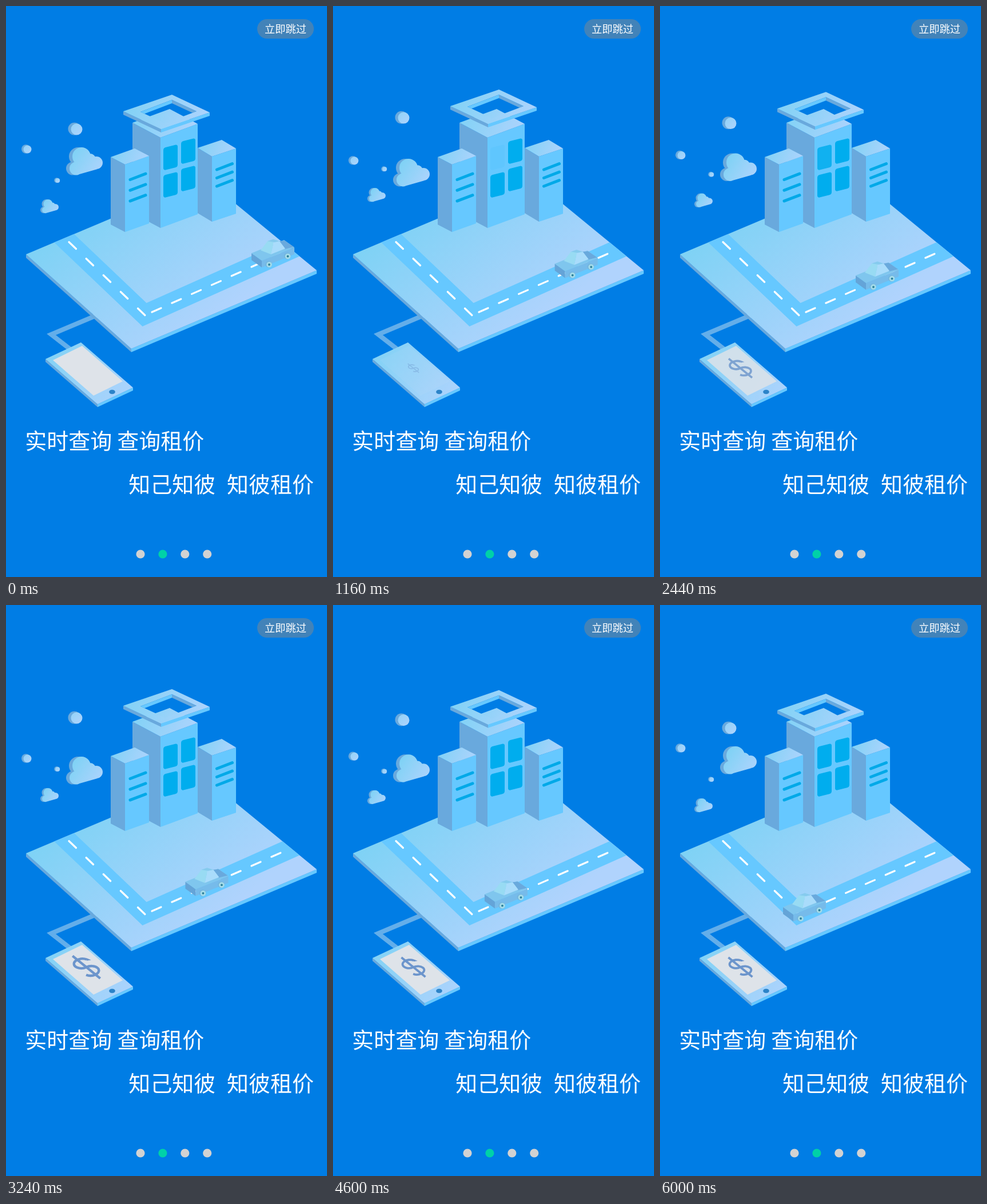
An HTML page with a canvas that plays this animation: 561x998 px, repeating every 6.04 s.

```html
<!DOCTYPE html>
<html lang="zh-CN">
<head>
<meta charset="utf-8">
<style>
  html, body { margin: 0; width: 100%; height: 100%; overflow: hidden; background: #007de5; }
  canvas, svg { position: absolute; left: 0; top: 0; width: 561px; height: 998px; }
  text { fill: #fff; font-family: "Noto Sans CJK SC", "Noto Sans CJK", "Noto Sans", sans-serif; }
  .big { font-size: 38px; }
  .skip { font-size: 18.3px; text-anchor: middle; }
</style>
</head>
<body>
<canvas id="stage" width="561" height="998"></canvas>
<svg viewBox="0 0 561 998">
  <text class="skip" x="488.5" y="46.5">立即跳过</text>
  <text class="big" x="33.3" y="774">实时查询</text>
  <text class="big" x="194.3" y="774">查询租价</text>
  <text class="big" x="214.3" y="850">知己知彼</text>
  <text class="big" x="386" y="850">知彼租价</text>
</svg>
<script>
const ctx = document.getElementById('stage').getContext('2d');
const LOOP = 6040, STEP = 40, TRIP = 6000;
const BG = '#007de5', SHADE = '#69a9dd', LIT = '#66c8ff', PANE = '#00adee';
const TAU = Math.PI * 2;

// Runs a drawing with its own canvas state, moved by (dx, dy)
function at(dx, dy, paint) {
  ctx.save();
  ctx.translate(dx, dy);
  paint();
  ctx.restore();
}

function sheen(x0, y0, x1, y1) {
  const g = ctx.createLinearGradient(x0, y0, x1, y1);
  g.addColorStop(0, '#7fd2f5');
  g.addColorStop(1, '#b0d3fd');
  return g;
}

function trace(...pts) {
  pts.forEach(([x, y], i) => i ? ctx.lineTo(x, y) : ctx.moveTo(x, y));
}

function poly(fill, ...pts) {
  ctx.beginPath();
  trace(...pts);
  ctx.fillStyle = fill;
  ctx.fill();
}

function stroke(color, width, cap, ...pts) {
  ctx.beginPath();
  trace(...pts);
  ctx.strokeStyle = color;
  ctx.lineWidth = width;
  ctx.lineCap = cap;
  ctx.stroke();
}

function disc(fill, x, y, rx, ry = rx) {
  ctx.beginPath();
  ctx.ellipse(x, y, rx, ry, 0, 0, TAU);
  ctx.fillStyle = fill;
  ctx.fill();
}

const add = (p, q) => [p[0] + q[0], p[1] + q[1]];

// Corners left, back, right, front of a tilted tile with edges a (backwards) and b (forwards)
function tile(left, a, b) {
  return [left, add(left, a), add(add(left, a), b), add(left, b)];
}

function slab([left, back, right, front], h, top, side = SHADE, face = LIT) {
  const down = [0, h];
  poly(side, left, front, add(front, down), add(left, down));
  poly(face, front, right, add(right, down), add(front, down));
  poly(top || sheen(left[0], back[1], right[0], front[1]), left, back, right, front);
}

function ground() {
  stroke('#63aeea', 8, 'butt', [160, 540], [79, 574], [115, 602]);
  const base = [[35, 434], [348, 302], [543, 462], [219, 599]];
  slab(base, 6, sheen(150, 345, 340, 575));
  ctx.save();
  ctx.beginPath();
  trace(...base);
  ctx.clip();
  stroke(LIT, 34.5, 'butt', [87, 392], [242, 539.5], [530, 411]);
  ctx.restore();
  for (let i = 0; i < 5; i++) {
    at(110 + i * 30.1, 412.5 + i * 29, () => stroke('#fff', 3.2, 'round', [0, 0], [12.5, 12]));
  }
  for (let i = 0; i < 7; i++) {
    at(255 + i * 34.8, 535 - i * 15.8, () => stroke('#fff', 3.2, 'round', [0, 0], [16, -7]));
  }
}

function windows(fade) {
  for (let i = 0; i < 4; i++) {
    const col = i % 2, row = i >> 1;
    ctx.save();
    ctx.transform(1, -0.25, 0, 1, 275 + col * 31, 248 - col * 11 + row * 48);
    ctx.globalAlpha = i ? 1 : fade;
    ctx.beginPath();
    ctx.roundRect(0, 0, 25, 39.5, 4);
    ctx.fillStyle = PANE;
    ctx.fill();
    ctx.restore();
  }
}

function slats(x, y, gap) {
  for (let i = 0; i < 3; i++) {
    at(x, y + i * gap, () => stroke('#00a9e8', 5, 'round', [0, 0], [27, -10.3]));
  }
}

function towers(fade) {
  slab(tile([221, 204], [65, -24], [49, 26]), 158);
  windows(fade);
  slab(tile([183, 264], [42, -15], [25, 13]), 118);
  slats(217, 303.5, 18.7);
  slab(tile([335, 248], [42, -14], [25, 15]), 114);
  slats(368.5, 286, 14.5);
}

function roof() {
  const outer = tile([205, 184], [85, -29], [66, 31]);
  const hole = tile([235, 185], [55, -21], [43, 20]);
  const [left, back, right] = hole, down = [0, 6];
  ctx.save();
  ctx.beginPath();
  trace(...hole);
  ctx.clip();
  poly(LIT, left, back, add(back, down), add(left, down));
  poly(SHADE, back, right, add(right, down), add(back, down));
  ctx.restore();

  // Everything but the hole
  ctx.beginPath();
  ctx.rect(0, 0, 561, 998);
  trace(...hole);
  ctx.clip('evenodd');
  slab(outer, 6);
}

function puff(fill) {
  ctx.beginPath();
  for (const [x, y, r] of [[122.5, 284, 11.5], [132, 263, 16], [147, 268, 10], [158, 274, 11]]) {
    ctx.moveTo(x + r, y);
    ctx.arc(x, y, r, 0, TAU);
  }
  trace([122, 274], [147, 262], [160, 285], [123, 295.5]);
  ctx.fillStyle = fill;
  ctx.fill();
}

function cloud() {
  at(-6, 0, () => puff(SHADE));
  puff(sheen(118, 255, 170, 290));
}

function ball(x, y, r) {
  disc(SHADE, x - r * 0.4, y - r * 0.08, r * 1.1);
  disc(sheen(x - r * 2, y - r * 2, x + r, y + r), x, y, r);
}

function floaters(sway) {
  at(0, sway, cloud);
  at(7.5, 214.5 - sway, () => {
    ctx.scale(0.5, 0.5);
    cloud();
  });
  ball(123.5, 215.5 - sway, 10);
  ball(37.5, 250.5 + sway, 7);
  ball(90.2, 305 - sway, 4);
}

function car() {
  slab(tile([429, 432], [57, -23], [18, 13]), 12, '#7fc6ee', '#64a4d8', '#76bbea');
  poly(SHADE, [477, 411], [487, 410], [503, 421], [487, 425]);
  poly('#98dbf3', [445, 427], [457, 411], [468, 411], [463, 434]);
  poly('#a9dcfb', [463, 434], [468, 411], [478, 411], [488, 424]);
  poly('#86cbee', [457, 411], [467, 407.5], [478, 411], [469, 413]);
  for (const [x, y] of [[460, 452], [492.5, 437.5]]) {
    disc('#74b6df', x - 1, y - 0.5, 5.8);
    disc('#a3dbe9', x, y, 4.8);
    disc('#2c7f97', x, y, 1.9);
  }
}

function dollar(size, alpha) {
  ctx.save();
  ctx.globalAlpha = alpha;
  ctx.translate(140.5, 633);
  ctx.scale(size, size);
  ctx.save();
  ctx.transform(20, -9.5, 21, 17, 0, 0);
  ctx.beginPath();
  trace([0, -1], [0, 1]);
  ctx.moveTo(0.46, -0.43);
  ctx.ellipse(0, -0.33, 0.49, 0.33, 0, -0.3, Math.PI / 2, true);
  ctx.ellipse(0, 0.33, 0.49, 0.33, 0, -Math.PI / 2, Math.PI - 0.3);
  ctx.restore();
  ctx.strokeStyle = '#6c95cc';
  ctx.lineWidth = 3.8;
  ctx.lineCap = 'butt';
  ctx.stroke();
  ctx.restore();
}

function phone(t, fade) {
  slab(tile([69, 617], [62, -29], [91, 79]), 5);
  ctx.globalAlpha = fade;
  poly('#dee3e9', ...tile([82, 619], [51, -25], [71, 62]));
  ctx.globalAlpha = 1;
  disc('#2c84c9', 185.5, 674.5, 5.3, 3.8);
  // Grows past full size, then settles
  const size = t < 3000 ? 1.2 * t / 3000 : Math.max(1, 1.2 - (t - 3000) / 5000);
  if (t > 0) dollar(size, Math.min(1, t / 3000));
}

function chrome() {
  ctx.beginPath();
  ctx.roundRect(439, 23, 99, 34, 17);
  ctx.fillStyle = '#4283b9';
  ctx.fill();
  for (let i = 0; i < 4; i++) disc(i === 1 ? '#00d1a8' : '#d2d2d2', 235 + i * 38.9, 958, 7.6);
}

// Quick fade out, slow eased return
function blink(t) {
  if (t < 800) return 1 - t / 800;
  const x = Math.min(1, (t - 800) / 2200);
  return x * x * (3 - 2 * x);
}

function draw(t) {
  const lift = 1 - Math.abs(t % 2000 - 1000) / 1000;
  const fade = blink(t), trip = t / TRIP;
  ctx.fillStyle = BG;
  ctx.fillRect(0, 0, 561, 998);
  chrome();
  ground();
  towers(fade);
  at(0, -10.6 * lift, roof);
  floaters(23.7 * lift);
  at(-214 * trip, 96 * trip, car);
  phone(t, fade);
}

const start = performance.now();
function tick() {
  const t = (performance.now() - start) % LOOP;
  draw(Math.floor(t / STEP) * STEP);
  requestAnimationFrame(tick);
}
tick();
</script>
</body>
</html>
```
